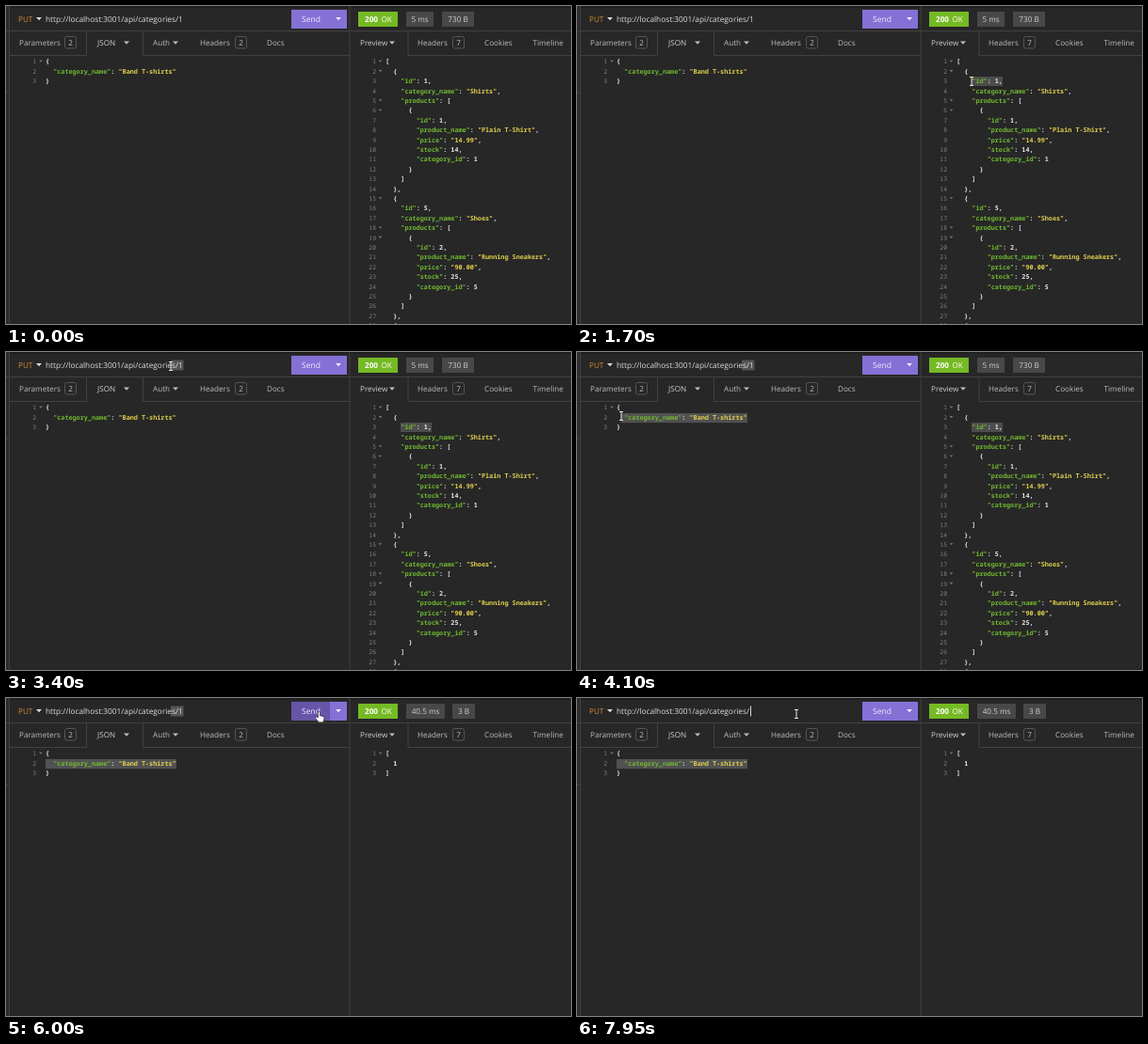
Animation of 600 by 338 pixels, one loop 8 s. Source, as an HTML page:

```html
<!DOCTYPE html>
<html lang="en">
<head>
<meta charset="utf-8">
<title>API client</title>
<style>
  html, body { margin: 0; width: 100%; height: 100%; overflow: hidden; background: #272727; }
  svg { display: block; width: 600px; height: 338px; }
  text { white-space: pre; text-rendering: geometricPrecision; }
  .ui { font: 8.15px "Open Sans", "Noto Sans", sans-serif; fill: #bdbdbd; }
  .code { font: 600 6.8px "Noto Sans Mono", "DejaVu Sans Mono", monospace; fill: #e6e6e6; }
  .num { font: 6.4px "Noto Sans Mono", "DejaVu Sans Mono", monospace; fill: #808080; text-anchor: end; }
  .key { fill: #70b832; }
  .str { fill: #e0d04e; }
</style>
</head>
<body>
<script>
const LOOP = 8000, LINE = 10.4, CHAR = 4.08;
const LOADING = 5250, LOADED = 5650;

function add(parent, tag, attrs = {}, content = "") {
  const el = document.createElementNS("http://www.w3.org/2000/svg", tag);
  for (const name in attrs) el.setAttribute(name, attrs[name]);
  el.textContent = content;
  return parent.appendChild(el);
}
const group = parent => add(parent, "g");
const rect = (parent, x, y, width, height, fill, more) =>
  add(parent, "rect", { x, y, width, height, fill, ...more });
const path = (parent, d, fill, more) => add(parent, "path", { d, fill, ...more });
const label = (parent, x, y, content, fill = "#bdbdbd", more = {}) =>
  add(parent, "text", { x, y: y + 2.9, class: "ui", style: `fill:${fill}`, ...more }, content);
const caret = (parent, x, y, fill = "#bdbdbd", w = 3) =>
  path(parent, `M${x - w} ${y - w / 2}h${2 * w}l${-w} ${w * 1.1}z`, fill);

function badge(parent, x, content) {
  rect(parent, x + .5, 32.5, 12, 12.5, "none", { rx: 2, stroke: "#555" });
  label(parent, x + 6.5, 39, content, "#bdbdbd", { "text-anchor": "middle", "font-size": 7 });
}

function pill(parent, x, width, content) {
  rect(parent, x, 6, width, 16, "#484848");
  label(parent, x + width / 2, 14, content, "#d0d0d0", { "text-anchor": "middle" });
}

function codeBlock(parent, x, numberX, foldX, lines) {
  lines.forEach((line, i) => {
    const y = 59 + i * LINE, trimmed = line.trimStart();
    add(parent, "text", { x: numberX, y: y + 2.3, class: "num" }, i + 1);
    if (/[[{]$/.test(line)) caret(parent, foldX, y - .4, "#777", 1.9);
    const row = add(parent, "text", {
      x: x + (line.length - trimmed.length) * CHAR, y: y + 2.4, class: "code"
    });
    for (const token of trimmed.match(/"[^"]*"|[^"]+/g)) {
      const isString = token[0] === '"';
      const isKey = isString && trimmed.includes(token + ":");
      add(row, "tspan", { class: isKey ? "key" : isString ? "str" : "" }, token);
    }
  });
}
const jsonLines = data => JSON.stringify(data, null, 2).split("\n");
const category = (id, category_name, product) =>
  ({ id, category_name, products: [{ ...product, category_id: id }] });

const stage = add(document.body, "svg", { viewBox: "0 0 600 338" });

// Panes, tab borders
rect(stage, 0, 0, 600, 338, "#272727");
rect(stage, 0, 0, 600, 1.5, "#1c1c1c");
rect(stage, 0, 0, 3, 338, "#2c2c2c");
rect(stage, 0, 91.5, 3, 1, "#444");
path(stage, "M0 26.5H600M3.5 0V338M365 0V338M3 52.5H85.5V26.5M145.5 26.5V52.5H365M427 26.5V52.5H600",
  "none", { stroke: "#414141" });

// Request bar
label(stage, 13, 14, "PUT", "#d98a35", { "font-size": 7.6 });
caret(stage, 35, 13.5, "#ddd");
const urlSelection = rect(stage, 175, 8.5, 13.5, 11, "#545454");
const url = label(stage, 42, 14, "", "#dedede");
url.style.fontSize = "8.31px";
const textCaret = rect(stage, 184.5, 8.5, .9, 11, "#eee");
rect(stage, 303, 4, 59, 20, "#8570d6");
const sendHover = rect(stage, 303, 4, 41, 20, "#6655a8");
label(stage, 314, 14, "Send", "#f0ecff").style.fontSize = "8.5px";
caret(stage, 353, 13.5, "#f0ecff", 3);

// Request tabs and body
label(stage, 14, 39, "Parameters");
badge(stage, 62, "2");
label(stage, 97, 39, "JSON", "#d0d0d0");
caret(stage, 128, 39);
label(stage, 156, 39, "Auth");
caret(stage, 180, 39);
label(stage, 206, 39, "Headers");
badge(stage, 243, "2");
label(stage, 277, 39, "Docs");
const bodySelection = rect(stage, 42, 65, 139, 10.2, "#515151");
codeBlock(stage, 42, 32, 37, jsonLines({ category_name: "Band T-shirts" }));

// Response
rect(stage, 374, 6, 42, 16, "#75ba24");
label(stage, 381, 14, "200", "#fff", { "font-weight": 700 }).style.fontWeight = 700;
label(stage, 398.5, 14, "OK", "#fff");
label(stage, 376, 39, "Preview", "#d0d0d0");
caret(stage, 410, 39);
label(stage, 437, 39, "Headers");
badge(stage, 474, "7");
label(stage, 508, 39, "Cookies");
label(stage, 559.5, 39, "Timeline");

const before = group(stage);
pill(before, 425, 29, "5 ms");
pill(before, 463, 34, "730 B");
const idSelection = rect(before, 419, 75, 33, 10, "#4d4d4d");
codeBlock(before, 403, 393, 397.5, jsonLines([
  category(1, "Shirts", { id: 1, product_name: "Plain T-Shirt", price: "14.99", stock: 14 }),
  category(5, "Shoes", { id: 2, product_name: "Running Sneakers", price: "90.00", stock: 25 }),
  { id: 4 }
]).slice(0, 28));

const after = group(stage);
pill(after, 425, 41, "40.5 ms");
pill(after, 474, 24, "3 B");
codeBlock(after, 403, 393, 397.5, jsonLines([1]));

// Loading overlay
const overlay = group(stage);
rect(overlay, 365.5, 0, 234.5, 338, "#181818", { opacity: .72 });
const middle = { "text-anchor": "middle" };
label(overlay, 545, 161, "Loading...", "#e4e4e4", middle);
const spinner = group(overlay);
for (const turn of [0, 180]) {
  const half = add(spinner, "g", { transform: `rotate(${turn})` });
  path(half, "M-14.5 -2.5A14.5 14.5 0 0 1 11 -9", "none", { stroke: "#dcdcdc", "stroke-width": 4 });
  path(half, "M16.5 -15.5V-3H4z", "#dcdcdc", { stroke: "#dcdcdc", "stroke-linejoin": "round" });
}
rect(overlay, 505, 234.5, 80, 20.5, "none", { rx: 2, stroke: "#8a8a8a" });
label(overlay, 545, 245, "Cancel Request", "#e4e4e4", middle);

// Mouse pointers
const beam = group(stage);
path(beam, "M-2 -4.5H2M0 -4.5V4.5M-2 4.5H2", "none", { stroke: "#e8e8e8", "stroke-width": 1 });
const hand = path(stage,
  "M-1.6 -5q1 -1.2 2 0v3.8l3.6 .9q1 .4 .9 1.8l-1 4.3h-4.8l-3.6 -4.6q0 -1.6 1.4 -1.1l1.5 1z",
  "#fff", { stroke: "#222", "stroke-width": .6 });

const route = [ // time, x, y
  [450, 520, 150], [850, 465, 78], [1000, 465, 78], [1250, 452, 80], [1650, 419, 80],
  [1800, 419, 80], [2350, 225, 15], [2600, 225, 15], [2900, 189, 15], [3250, 175, 15],
  [3400, 175, 15], [3700, 181, 71], [4100, 47, 68], [4250, 42, 70], [4400, 42, 70],
  [4950, 333, 20], [6000, 333, 20], [6600, 233, 17], [LOOP, 233, 17]
];

function pointerAt(t) {
  const i = Math.max(1, route.findIndex(step => step[0] > t));
  const [t0, x0, y0] = route[i - 1], [t1, x1, y1] = route[i];
  const p = Math.max(0, (t - t0) / (t1 - t0)), ease = p * p * (3 - 2 * p);
  return [x0 + (x1 - x0) * ease, y0 + (y1 - y0) * ease];
}

const show = (el, visible) => el.setAttribute("visibility", visible ? "visible" : "hidden");
const clamp = (v, low, high) => Math.min(high, Math.max(low, v));

// Selections are dragged leftwards from their right end.
function select(el, t, start, stop, end, left, right) {
  const x = t < stop ? clamp(pointerAt(t)[0], left, right) : left;
  el.setAttribute("x", x);
  el.setAttribute("width", right - x);
  el.style.display = t >= start && t < end ? "" : "none";
}

function render(t) {
  const [x, y] = pointerAt(t), overSend = x > 303 && x < 362 && y < 25;
  const place = `translate(${x} ${y})`;
  beam.setAttribute("transform", place);
  hand.setAttribute("transform", place);
  show(beam, t >= 450 && !overSend);
  show(hand, overSend);
  show(sendHover, overSend && t < 6000 || t >= 6000 && t < 6900);

  select(idSelection, t, 1250, 1650, LOADED, 419, 452);
  select(urlSelection, t, 2900, 3250, 6700, 175, 188.5);
  select(bodySelection, t, 3700, 4250, LOOP, 42, 181);

  const erased = t >= 7700;
  url.textContent = "http://localhost:3001/api/categories/" + (erased ? "" : "1");
  textCaret.setAttribute("x", erased ? 184 : 188.5);
  show(textCaret, erased || t >= 6850 && (t - 6850) % 1000 < 500);

  show(before, t < LOADED);
  show(after, t >= LOADED);
  overlay.style.display = t >= LOADING && t < LOADED ? "" : "none";
  overlay.style.opacity = clamp((t - LOADING) / 100, 0, 1);
  spinner.setAttribute("transform", `translate(545 195) rotate(${(t - 5350) * .18})`);
}

const start = performance.now();
function tick() {
  render((performance.now() - start) % LOOP);
  requestAnimationFrame(tick);
}
tick();
</script>
</body>
</html>
```
